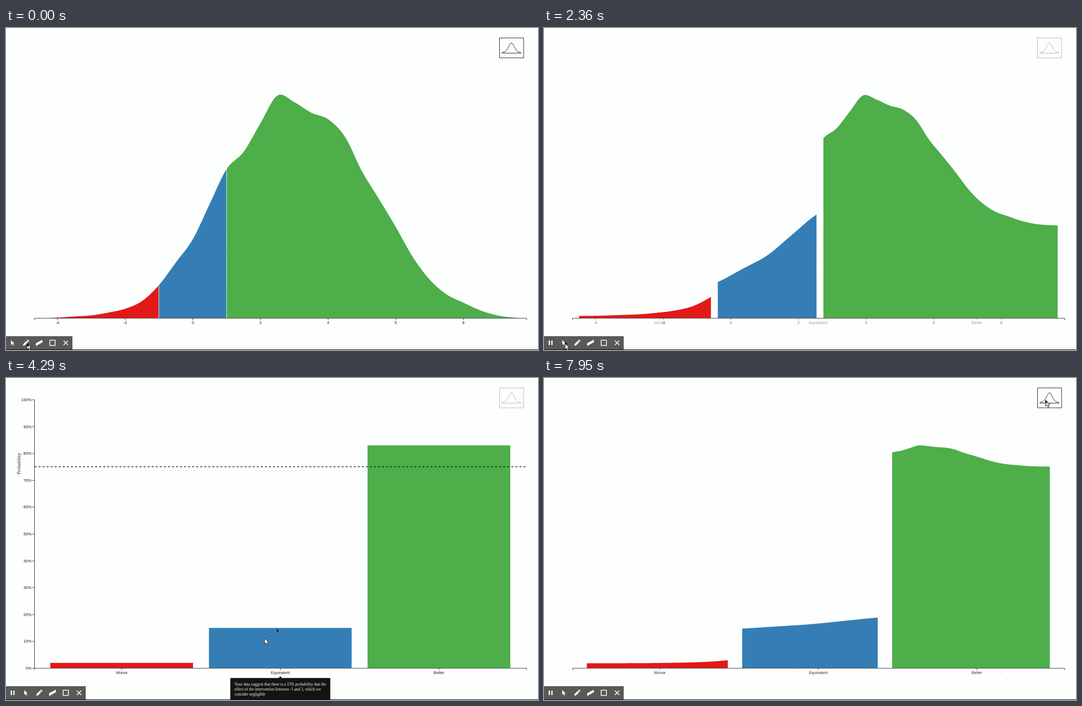
An HTML page with a canvas for the animation above (8000 ms loop, 961 by 583 pixels).

```html
<!DOCTYPE html>
<html lang="en">
<head>
<meta charset="utf-8">
<style>
  html, body { margin: 0; width: 100%; height: 100%; overflow: hidden; background: #fdfefe; }
  canvas { display: block; }
</style>
</head>
<body>
<canvas id="stage" width="961" height="583"></canvas>
<script>
const ctx = document.getElementById('stage').getContext('2d');
const LOOP = 8000, BASE = 525.3, INK = '#222';
const LEFT = 51.5, RIGHT = 940.5, ZERO = 337.5, UNIT = 61.1, PERCENT = 4.86;
const SANS = '7.3px "Liberation Sans", Arial, sans-serif';
const SERIF = '"Liberation Serif", Times, serif';

// Curve heights at every half unit, starting at -4.5
const heights = [0, 1, 3, 5, 10, 17, 31, 60, 101, 143, 207, 270, 301, 353, 403, 391,
  372, 360, 328, 266, 216, 165, 111, 70, 43, 28, 14, 5, 1, 0];
const groups = [
  { name: 'Worse', color: '#e11a18', from: LEFT, to: 275.6, share: 2 },
  { name: 'Equivalent', color: '#357eb5', from: 276.4, to: 398.1, share: 15 },
  { name: 'Better', color: '#4dae4a', from: 398.9, to: 940, share: 83 }
];
const BAND = 286.5, BAR_WIDTH = 257.8;
const bandCenter = i => 209 + BAND * i;

const morphPath = [[700, 0], [2360, .47], [2910, .648], [3980, 1], [7090, 1], [8000, .696]];
const pointerPath = [
  [2560, 38, 571], [2740, 95, 10], [2910, 137, 51], [3110, 177, 75], [4220, 467, 471], [4450, 467, 471],
  [4490, 489, 454], [4650, 489, 454], [5200, 850, 300], [5870, 850, 300], [6190, 870, 76], [6540, 870, 76],
  [6800, 906, 45], [7300, 906, 45], [7500, 906, 40]
];
const POINTER_LEAD = 200;

const lerp = (a, b, k) => a + (b - a) * k;
const ramp = (t, from, to) => Math.min(1, Math.max(0, (t - from) / (to - from)));
const cubicInOut = k => k < .5 ? 4 * k ** 3 : 1 - 4 * (1 - k) ** 3;

function follow(keys, t) {
  const i = keys.findIndex(k => k[0] > t);
  const b = keys[i < 0 ? keys.length - 1 : i], a = i > 0 ? keys[i - 1] : b;
  const k = ramp(t, a[0], b[0]) || 0;
  return a.slice(1).map((v, j) => lerp(v, b[j + 1], k));
}

// Catmull-Rom spline through the heights
function density(x) {
  const s = Math.max(0, 2 * (x - ZERO) / UNIT + 9), i = Math.floor(s), u = s - i;
  const [a, b, c, d] = [i - 1, i, i + 1, i + 2].map(k => heights[k] || 0);
  return BASE - (b + u / 2 * (c - a + u * (2 * a - 5 * b + 4 * c - d + u * (3 * (b - c) + d - a))));
}

function path(points, close) {
  ctx.beginPath();
  points.forEach(([x, y]) => ctx.lineTo(x, y));
  if (close) ctx.closePath();
}

function fill(points, color) {
  path(points, true);
  ctx.fillStyle = color;
  ctx.fill();
}

function stroke(points, color, width = 1, close = false) {
  path(points, close);
  ctx.strokeStyle = color;
  ctx.lineWidth = width;
  ctx.stroke();
}

function box(x, y, w, h, color) {
  ctx.fillStyle = color;
  ctx.fillRect(x, y, w, h);
}

function text(str, x, y, align = 'center', font = SANS, color = INK) {
  ctx.font = font;
  ctx.textAlign = align;
  ctx.fillStyle = color;
  ctx.fillText(str, x, y);
}

function faded(alpha, draw) {
  if (alpha <= 0) return;
  ctx.save();
  ctx.globalAlpha = alpha;
  draw();
  ctx.restore();
}

function drawGroup({ color, from, to, share }, index, p) {
  const steps = Math.ceil(to - from), outline = [];
  const bar = bandCenter(index) - BAR_WIDTH / 2, top = BASE + .1 - PERCENT * share;
  for (let i = 0; i <= steps; i++) {
    const u = i / steps, x = lerp(from, to, u);
    outline.push([lerp(x, bar + BAR_WIDTH * u, p), lerp(density(x), top, p)]);
  }
  fill([[outline[0][0], BASE], ...outline, [outline[steps][0], BASE]], color);
}

function xTick(label, x) {
  stroke([[x, 525.5], [x, 529]], '#444');
  text(label, x, 535.5);
}

function drawXAxis(p) {
  stroke([[LEFT, 529], [LEFT, 525.5], [RIGHT, 525.5], [RIGHT, 529]], '#555');
  faded(1 - p, () => {
    for (let v = -4; v <= 8; v += 2) xTick(String(v), ZERO + UNIT * v);
  });
  faded(p, () => groups.forEach((g, i) => xTick(g.name, bandCenter(i))));
}

function drawYAxis() {
  stroke([[LEFT, 39.5], [LEFT, 525.5]], '#444');
  for (let v = 0; v <= 100; v += 10) {
    const y = 525.5 - PERCENT * v;
    stroke([[LEFT - 4, y], [LEFT, y]], '#444');
    text(v + '%', 46, y + 2.5, 'right');
  }
  ctx.save();
  ctx.translate(26, 155);
  ctx.rotate(-Math.PI / 2);
  text('Probability', 0, 0, 'center', '8.8px ' + SERIF);
  ctx.restore();
  ctx.setLineDash([3.65, 3.65]);
  stroke([[LEFT, 160.6], [RIGHT, 160.6]], '#111', 1.1);
  ctx.setLineDash([]);
}

function drawIcon() {
  ctx.strokeStyle = '#333';
  ctx.lineWidth = 1;
  ctx.strokeRect(891.5, 18, 43.5, 36);
  stroke([[895, 45.5], [931, 45.5]], '#333');
  const bell = [];
  for (let x = -17; x <= 17; x++) bell.push([913 + x, 44 - 17 * Math.exp(-x * x / 52)]);
  stroke(bell, '#333');
}

function drawTooltip(x, lines) {
  box(x - 90.3, 543.2, 180.6, 11.2 + 9.2 * lines.length, '#141414');
  fill([[x - 3.5, 543.5], [x, 540], [x + 3.5, 543.5]], '#141414');
  lines.forEach((line, i) => text(line, x - 82.7, 557 + 9.1 * i, 'left', '7.3px ' + SERIF, '#f4f4f4'));
}

const arrow = (x, y, s) => [[0, 0], [0, 12], [2.8, 9.5], [4.8, 14], [6.8, 13], [4.9, 8.8], [8.5, 8.6]]
  .map(([a, b]) => [x + a * s, y + b * s]);

const tools = {
  pause() {
    for (const x of [-3.5, 1.2]) box(x, -4, 2.3, 8, '#fff');
  },
  select() { fill(arrow(-3, -5, .72), '#fff'); },
  pencil() {
    ctx.rotate(-Math.PI / 4);
    fill([[-7.5, 0], [-5, -1.8], [3, -1.8], [3, 1.8], [-5, 1.8]], '#fff');
    box(4, -1.8, 2.6, 3.6, '#fff');
  },
  eraser() { fill([[-6, .8], [6, -5.8], [6, -1], [-6, 5.8]], '#fff'); },
  frame() {
    ctx.strokeStyle = '#fff';
    ctx.lineWidth = 1.4;
    ctx.strokeRect(-4.7, -4.7, 9.4, 9.4);
  },
  close() {
    for (const d of [-4, 4]) stroke([[-4, d], [4, -d]], '#fff', 1.4);
  }
};

function drawToolbar(recording) {
  const names = Object.keys(tools).slice(recording ? 0 : 1);
  box(0, 558, 24 * names.length, 24, '#595959');
  box(0, 582, 961, 1, '#111');
  names.forEach((name, i) => {
    ctx.save();
    ctx.translate(12 + 24 * i, 570);
    tools[name]();
    ctx.restore();
  });
}

// A small dark pointer runs ahead of the large one
function drawPointers(t) {
  const large = arrow(...follow(pointerPath, t), .92);
  fill(large, '#fff');
  stroke(large, '#222', 1, true);
  fill(arrow(...follow(pointerPath, t + POINTER_LEAD), .48), '#111');
}

function render(t) {
  const p = cubicInOut(follow(morphPath, t)[0]);
  box(0, 0, 961, 583, '#fdfefe');
  groups.forEach((g, i) => drawGroup(g, i, p));
  drawXAxis(p);
  faded(ramp(t, 3700, 4200) - ramp(t, 7000, 7500), drawYAxis);
  faded(t < 720 ? 1 : lerp(.32, 1, ramp(t, 6700, 7050)), drawIcon);
  if (t >= 4150 && t < 4650) drawTooltip(bandCenter(1), [
    'Your data suggest that there is a 15% probability that the',
    'effect of the intervention between -1 and 1, which we',
    'consider negligible'
  ]);
  if (t >= 4900 && t < 5990) drawTooltip(bandCenter(2), [
    'Your data suggest that there is a 83% probability that the',
    'effect of the intervention is greater than 1'
  ]);
  drawToolbar(t >= 100);
  drawPointers(t);
}

const start = performance.now();
function loop() {
  render((performance.now() - start) % LOOP);
  requestAnimationFrame(loop);
}
loop();
</script>
</body>
</html>
```
